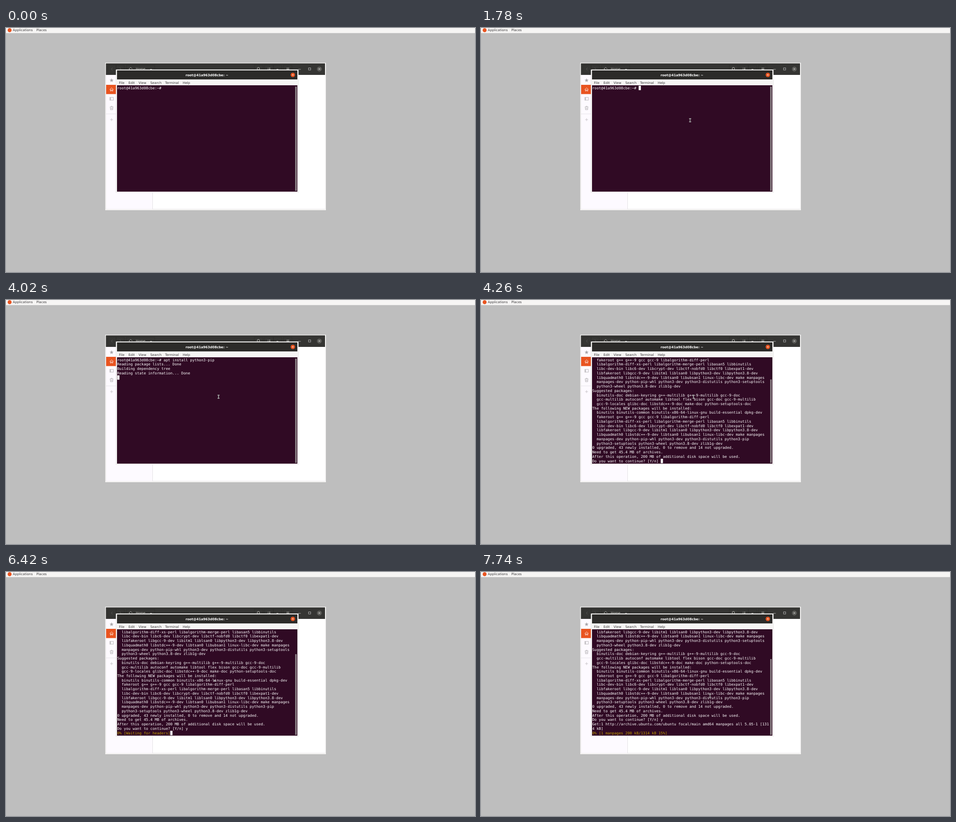
An HTML page with a canvas that plays this animation: 1035x541 px, repeating every 7990 ms.

```html
<!DOCTYPE html>
<html lang="en">
<meta charset="utf-8">
<title>Terminal session</title>
<style>
html, body { margin: 0; width: 100%; height: 100%; overflow: hidden; background: #bebebe; }
canvas { display: block; }
</style>
<canvas id="stage" width="1035" height="541"></canvas>
<script>
const ctx = document.getElementById('stage').getContext('2d');
ctx.textRendering = 'geometricPrecision';
const LOOP = 7990, ROWS = 24, LEFT = 245.5, TOP = 128, CELL_W = 4.876, CELL_H = 9.74;
const UI = '7.2px "DejaVu Sans", sans-serif', MONO = '8.1px "DejaVu Sans Mono", monospace';
const WINE = '#300a24', INK = '#3a383a', YELLOW = '#c4a000', ORANGE = '#e95420';
const HOST = 'root@41a963d08cbe';

// Terminal contents
const prompt = HOST + ':~# ';
const command = prompt + 'apt install python3-pip';
const lists = command + '\nReading package lists... ';
const tree = lists + 'Done\nBuilding dependency tree';
const info = tree + '\nReading state information... ';
const shared = `
  binutils binutils-common binutils-x86-64-linux-gnu build-essential dpkg-dev
  fakeroot g++ g++-9 gcc gcc-9 libalgorithm-diff-perl
  libalgorithm-diff-xs-perl libalgorithm-merge-perl libasan5 libbinutils
  libc-dev-bin libc6-dev libcrypt-dev libctf-nobfd0 libctf0 libexpat1-dev
  libfakeroot libgcc-9-dev libitm1 liblsan0 libpython3-dev libpython3.8-dev
  libquadmath0 libstdc++-9-dev libtsan0 libubsan1 linux-libc-dev make manpages
  manpages-dev python-pip-whl python3-dev python3-distutils python3-`;
const summary = info + `Done
The following additional packages will be installed:${shared}setuptools
  python3-wheel python3.8-dev zlib1g-dev
Suggested packages:
  binutils-doc debian-keyring g++-multilib g++-9-multilib gcc-9-doc
  gcc-multilib autoconf automake libtool flex bison gcc-doc gcc-9-multilib
  gcc-9-locales glibc-doc libstdc++-9-doc make-doc python-setuptools-doc
The following NEW packages will be installed:${shared}pip
  python3-setuptools python3-wheel python3.8-dev zlib1g-dev
0 upgraded, 43 newly installed, 0 to remove and 14 not upgraded.
`;
const question = summary + `Need to get 45.4 MB of archives.
After this operation, 200 MB of additional disk space will be used.
Do you want to continue? [Y/n] `;
const fetching = question + `y
Get:1 http://archive.ubuntu.com/ubuntu focal/main amd64 manpages all 5.05-1 [131
4 kB]
0% [1 manpages `;

// [time, text, caret]
const OFF = 0, BLOCK = 1, HOLLOW = 2, LINE_START = 3;
const steps = [
  [0, prompt, OFF], [380, prompt, BLOCK], [910, prompt, HOLLOW], [1780, prompt, BLOCK],
  [1860, command, BLOCK], [2400, command, OFF], [2700, command + '\n', BLOCK],
  [2780, lists + '0%', LINE_START], [2860, lists + '3%', LINE_START],
  [3180, lists + '38%', LINE_START], [3330, lists + '38%', OFF],
  [3635, tree + '... 0%', LINE_START], [3790, tree + '... 50%', LINE_START],
  [3940, info + '0%', LINE_START], [4020, info + 'Done\n', BLOCK],
  [4190, summary, BLOCK], [4260, question, BLOCK], [4490, question, OFF],
  [5120, question, BLOCK], [5500, question + 'y', BLOCK],
  [5960, question + 'y\n0% [Working]', BLOCK],
  [6420, question + 'y\n0% [Waiting for headers]', BLOCK],
  [6500, fetching + '14.2 kB/1314 kB 1%]', BLOCK],
  [6825, fetching + '51.1 kB/1314 kB 4%]', BLOCK],
  [7130, fetching + '128 kB/1314 kB 10%]', BLOCK],
  [7510, fetching + '200 kB/1314 kB 15%]', BLOCK],
  [7740, fetching + '200 kB/1314 kB 15%]', OFF]
];

// [first step, last step, step count, x, y]
const moves = [
  [70, 850, 11, 424, 171.5], [1230, 1550, 5, 461.5, 204.5], [3480, 3790, 5, 469, 214.5],
  [4720, 4870, 3, 460.5, 241], [6750, 7360, 9, 505.5, 274.5]
];

const between = (t, a, b) => t >= a && t < b;

function rect(x, y, w, h, color) {
  ctx.fillStyle = color;
  ctx.fillRect(x, y, w, h);
}

function frame(x, y, w, h, color, width = 0.6) {
  ctx.strokeStyle = color;
  ctx.lineWidth = width;
  ctx.strokeRect(x, y, w, h);
}

function label(text, x, y, color = INK, font = UI) {
  ctx.font = font;
  ctx.fillStyle = color;
  ctx.fillText(text, x, y);
}

function disc(x, y, r, color) {
  ctx.fillStyle = color;
  ctx.beginPath();
  ctx.arc(x, y, r, 0, 7);
  ctx.fill();
}

function line(path, color, width = 0.8) {
  ctx.strokeStyle = color;
  ctx.lineWidth = width;
  ctx.stroke(new Path2D(path));
}

function closeButton(x, y, r, color) {
  disc(x, y, r, color);
  line(`M${x - 1.6} ${y - 1.6}l3.2 3.2m0-3.2l-3.2 3.2`, '#fff');
}

function drawDesktop() {
  rect(0, 0, 1035, 541, '#bebebe');
  rect(0, 0, 1035, 11.3, '#f6f5f4');
  disc(8, 4.8, 4.4, ORANGE);
  label('Applications', 15, 7.2);
  label('Places', 67, 7.2);
}

function drawFiles() {
  const grey = '#aaa7aa', dim = '#b5b5b0';
  rect(219, 77, 487, 327, '#f6f5f4');
  rect(220.5, 78.5, 483.5, 323.5, '#d8d6d6');
  rect(221, 104, 483, 297.5, '#fff');
  rect(221, 104, 102, 297.5, '#fdfaff');
  rect(323, 104, 0.7, 297.5, '#d9d5da');
  rect(220.5, 78.5, 483.5, 25.5, '#353533');
  for (const [x, w] of [[225, 18], [243, 18], [266, 62], [548, 19], [570, 20], [590, 18], [612, 19]])
    frame(x, 82.5, w, 17, '#292927');
  line('M235 88l-2.5 3 2.5 3M251 88l2.5 3-2.5 3', '#60605d');
  line('M271 91l4-4 4 4M272.5 90v4', dim);
  label('Home', 286.5, 93.2, dim);
  line('M318 91.5h4M597 91.5h4M619 89h6M619 91.5h6M577 89h1m1.5 0h4M577 91.5h1m1.5 0h4', dim, 1);
  ctx.beginPath();
  ctx.arc(557, 90, 2.7, 0, 7);
  ctx.stroke();
  line('M645 91.7h5.5', '#ccc');
  frame(667.7, 88.5, 4.6, 4.6, '#ccc', 0.8);
  closeButton(691.5, 91, 5.4, '#5b5b58');

  rect(221, 126, 22, 20.5, ORANGE);
  ctx.fillStyle = grey;
  ctx.fill(new Path2D('M233 111.5l1.2 3 3.2.2-2.5 2 .9 3.2-2.8-1.8-2.8 1.8.9-3.2-2.5-2 3.2-.2z'));
  line('M229 136.5l4-4 4 4M230.3 135.5v4.3h1.7v-2.5h2v2.5h1.7v-4.3', '#fff');
  frame(229, 154, 8, 6, grey, 0.8);
  line('M230.7 154v6', grey, 1.2);
  line('M229 175h8M231.5 174.5v-1h3v1M230 175.5l.5 5.8h5l.5-5.8M232 177v3M234 177v3', grey);
  rect(221, 190, 22, 0.7, '#dedade');
  line('M229.8 203.2h6.4M233 200v6.4', '#bbb8bb');
}

function drawTerminal(text, caret) {
  rect(242, 92, 404, 273, 'rgba(0,0,0,.12)');
  rect(242.5, 92, 403, 272.7, '#f6f5f4');
  rect(245, 94, 398, 20, '#2c2b29');
  ctx.textAlign = 'center';
  label(HOST + ': ~', 443.5, 106.6, '#fff', 'bold ' + UI);
  ctx.textAlign = 'left';
  closeButton(633, 104, 4.8, ORANGE);
  [['File', 249.3], ['Edit', 270.2], ['View', 292.5], ['Search', 318.5], ['Terminal', 351], ['Help', 390]]
    .forEach(([name, x]) => label(name, x, 123.6));
  rect(245, 127, 398, 235.8, WINE);

  const lines = text.split('\n'), shown = lines.slice(-ROWS);
  const thumb = 231 * ROWS / Math.max(ROWS, lines.length);
  rect(638.2, 361 - thumb, 3.4, thumb, '#8d8588');

  const baseline = row => TOP + 7.6 + row * CELL_H;
  shown.forEach((s, row) =>
    label(s, LEFT, baseline(row), /^0% \[/.test(s) ? YELLOW : '#fff', MONO));

  if (caret === OFF) return;
  const row = shown.length - 1, last = shown[row];
  const col = caret === LINE_START ? 0 : last.length;
  const x = LEFT + col * CELL_W, y = TOP + row * CELL_H;
  if (caret === HOLLOW) return frame(x + 2.6 - CELL_W / 2 + 2.2, y + 0.4, CELL_W - 0.2, 9.2, '#fff', 0.7);
  rect(x, y, CELL_W, CELL_H, '#fff');
  if (last[col]) label(last[col], x, baseline(row), WINE, MONO);
}

function drawMenu(mouseY) {
  rect(423.7, 171.6, 83.6, 114, '#cfcbd0');
  rect(424.2, 172.1, 82.6, 113, '#fdfaff');
  if (mouseY > 201) rect(424.2, 201, 82.6, 13, '#ebe7ec');
  [['Copy', 180.5], ['Copy as HTML', 194], ['Paste', 207.6], ['Read-Only', 221.6], ['Preferences', 235.2],
   ['New Window', 249.2], ['New Tab', 262.8], ['Show Menubar', 276.8]]
    .forEach(([name, y], i) => label(name, 439.5, y + 2.6, i < 2 ? '#a6a2a6' : INK));
  for (const y of [214.3, 242, 269.5]) rect(424.2, y, 82.6, 0.6, '#dcd8dd');
  line('M429 276.8l1.8 1.8 3.4-4', INK, 1.1);
}

function mouseAt(t) {
  let x = 970, y = 548;
  for (const [start, end, count, toX, toY] of moves) {
    if (t < start) break;
    const k = Math.floor((t - start) / (end - start) * (count - 1) + 1e-6) + 1;
    const p = Math.min(1, k / count), e = p * p * (3 - 2 * p);
    x += (toX - x) * e;
    y += (toY - y) * e;
  }
  return [x, y];
}

function drawMouse(t, x, y) {
  const overText = between(x, 245, 643) && between(y, 127, 363);
  ctx.save();
  ctx.translate(x, y);
  if (between(t, 910, 1780) || !overText) {
    const arrow = new Path2D('M0 0v7.2l1.7-1.6 1.2 2.7 1.2-.5-1.2-2.6h2.3z');
    ctx.strokeStyle = '#fff';
    ctx.lineWidth = 0.9;
    ctx.stroke(arrow);
    ctx.fillStyle = '#000';
    ctx.fill(arrow);
  } else if (between(t, 2700, 3480) || between(t, 5500, 6750)) {
    rect(-1.6, -1.6, 3.2, 3.2, '#fff');
    rect(-0.7, -0.7, 1.4, 1.4, '#000');
  } else {
    const beam = 'M-2.2-3.7h1.6l.6.6.6-.6h1.6M0-3.1v6.2M-2.2 3.7h1.6l.6-.6.6.6h1.6';
    line(beam, '#fff', 1.8);
    line(beam, '#000', 0.7);
  }
  ctx.restore();
}

function draw(now) {
  const t = now % LOOP;
  const [, text, caret] = steps.findLast(step => step[0] <= t);
  const [x, y] = mouseAt(t);
  drawDesktop();
  drawFiles();
  drawTerminal(text, caret);
  if (between(t, 1010, 1780)) drawMenu(y);
  drawMouse(t, x, y);
  requestAnimationFrame(draw);
}
requestAnimationFrame(draw);
</script>
</html>
```
